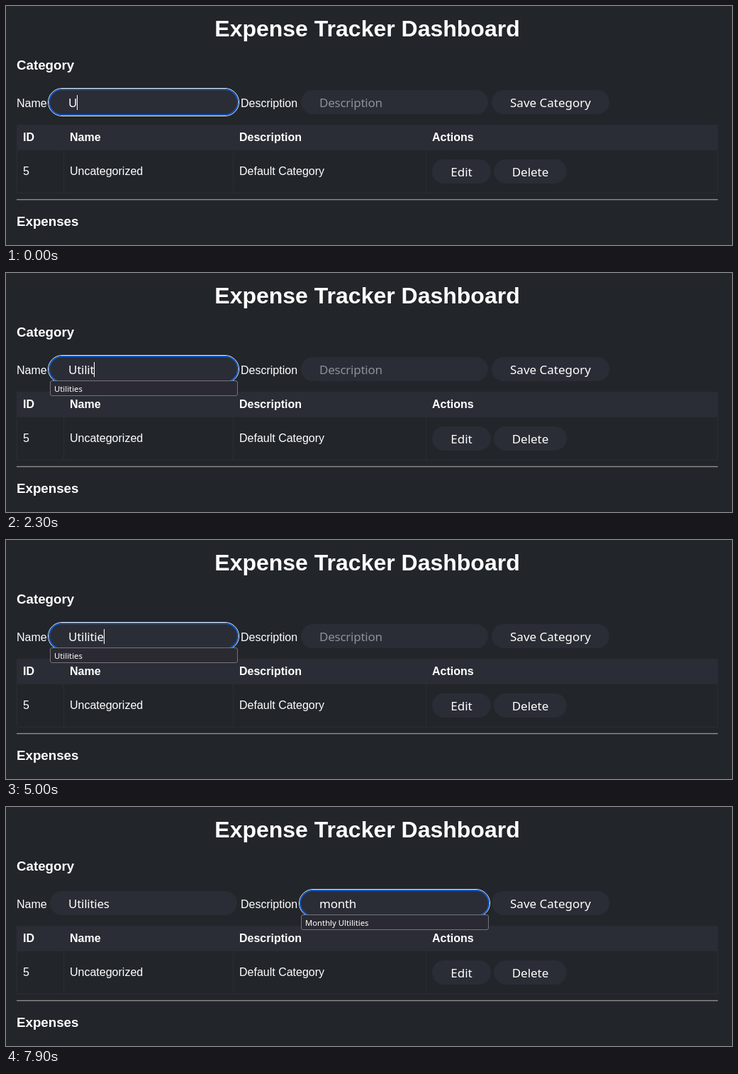
An HTML page that plays this animation: 1024 px wide and 338 px high, repeating every 8000 ms.

```html
<!DOCTYPE html>
<html lang="en">
<head>
<meta charset="utf-8">
<title>Expense Tracker Dashboard</title>
<style>
html, body { margin: 0; width: 100%; height: 100%; overflow: hidden; background: #22262b; }
svg { display: block; width: 100%; height: 100%; }
text { font: 16px "Liberation Sans", Arial, sans-serif; fill: #fff; white-space: pre; }
.h1 { font-size: 32px; font-weight: 700; text-anchor: middle; }
.h3 { font-size: 18.72px; font-weight: 700; }
.th { font-weight: 700; }
.btn, .field { font: 17px "Noto Sans", sans-serif; }
.btn { text-anchor: middle; }
.field { letter-spacing: -.25px; }
.hint { fill: #8e9096; }
.item { font: 11.3px "Noto Sans", sans-serif; }
.pill, .head { fill: #2a2d35; }
.grid { fill: none; stroke: #2a2d34; }
.ring rect { fill: none; }
.list rect { fill: #2b2a33; stroke: #74727b; }
</style>
</head>
<body>
<svg viewBox="0 0 1024 338"></svg>
<script>
const LOOP = 8000, TICK = 100, BLINK = 500;
const svg = document.querySelector('svg');

function add(tag, attrs, parent = svg, content = '') {
  const node = document.createElementNS('http://www.w3.org/2000/svg', tag);
  for (const key in attrs) node.setAttribute(key, attrs[key]);
  node.textContent = content;
  return parent.appendChild(node);
}
const label = (x, y, content, cls = '', parent = svg) => add('text', { x, y, class: cls }, parent, content);
const pill = (x, y, width) => add('rect', { x, y, width, height: 34, rx: 17, class: 'pill' });
const show = (node, on) => { node.style.display = on ? '' : 'none'; };

function button(x, y, width, content) {
  pill(x, y, width);
  label(x + width / 2, y + 24, content, 'btn');
}

function field(x, hint, suggestion) {
  pill(x, 119, 264);
  const ring = add('g', { class: 'ring' });
  add('rect', { x: x - 2.5, y: 116.5, width: 269, height: 39, rx: 19.5, stroke: '#f4f6f8' }, ring);
  add('rect', { x: x - 1, y: 118, width: 266, height: 36, rx: 18, stroke: '#1659c4', 'stroke-width': 2 }, ring);
  const text = label(x + 26, 143, '', 'field');
  const caret = add('rect', { y: 126, width: 1, height: 21, fill: '#fff' });
  const list = add('g', { class: 'list' });
  return {
    mount() {
      svg.append(list);
      add('rect', { x: x + .5, y: 152.5, width: 264, height: 21, rx: 2.5 }, list);
      label(x + 6, 168, suggestion, 'item', list);
    },
    draw(value, focused, caretOn, open) {
      text.textContent = value || hint;
      text.classList.toggle('hint', !value);
      show(ring, focused);
      show(caret, focused && caretOn);
      show(list, focused && open);
      const advance = value ? text.getComputedTextLength() : 0;
      caret.setAttribute('x', Math.round(x + 26 + advance));
    }
  };
}

label(509.5, 43, 'Expense Tracker Dashboard', 'h1');
label(15, 90, 'Category', 'h3');
label(15, 143, 'Name');
label(331, 143, 'Description');
const nameField = field(62, 'Name', 'Utilities');
const noteField = field(416, 'Description', 'Monthly Ultilities');
button(685, 119, 166, 'Save Category');

add('rect', { x: 15, y: 168, width: 989, height: 36, class: 'head' });
add('path', { d: 'M15.5 204V264.5H1003.5V204M81.5 168V264M320.5 168V264M592.5 168V264', class: 'grid' });
[[24, 'ID', '5'], [90, 'Name', 'Uncategorized'], [329, 'Description', 'Default Category'], [601, 'Actions', '']]
  .forEach(([x, head, cell]) => {
    label(x, 191, head, 'th');
    label(x, 239, cell);
  });
button(601, 217, 83, 'Edit');
button(688, 217, 103, 'Delete');
add('rect', { x: 15, y: 273, width: 989, height: 1.5, fill: '#858585' });
label(15, 311, 'Expenses', 'h3');
nameField.mount();
noteField.mount();
const pointer = add('path', {
  d: 'M-3 -7.5H-1L0 -6.5L1 -7.5H3M0 -6.5V6.5M-3 7.5H-1L0 6.5L1 7.5H3',
  fill: 'none', stroke: '#c4c5c8'
});

// [start, name, description, focus on description, suggestions open]
const steps = [[0, 'U', '', false, false]];
function type(start, gap, word, from, to, note = false, openAt = 2) {
  const dir = Math.sign(to - from);
  for (let n = from, t = start; n !== to + dir; n += dir, t += gap) {
    const part = word.slice(0, n);
    steps.push([t, note ? 'Utilities' : part, note ? part : '', note, n >= openAt]);
  }
}
type(200, 200, 'Utilit', 2, 6);
steps.push([2800, 'Utilit', '', false, false]);
type(3400, 100, 'Utilit', 5, 1, false, 9);
type(4400, 100, 'Utilities', 2, 9);
steps.push([5500, 'Utilities', '', true, false]);
type(7000, 100, 'month', 1, 5, true, 1);

function draw(now) {
  const t = Math.floor((now % LOOP) / TICK) * TICK;
  const [start, name, note, onNote, open] = steps.findLast(step => step[0] <= t);
  const caretOn = (t - start) % (2 * BLINK) < BLINK;
  nameField.draw(name, !onNote, caretOn, open);
  noteField.draw(note, onNote, caretOn, open);
  const ease = (1 - Math.min(1, Math.max(0, (t - 2400) / 400))) ** 2;
  pointer.setAttribute('transform', `translate(${236.5 + 40 * ease} ${132 + 10 * ease})`);
  show(pointer, t >= 2400 && t < 3400);
}

function loop() {
  draw(performance.now() - origin);
  requestAnimationFrame(loop);
}
const origin = performance.now();
loop();
</script>
</body>
</html>
```
